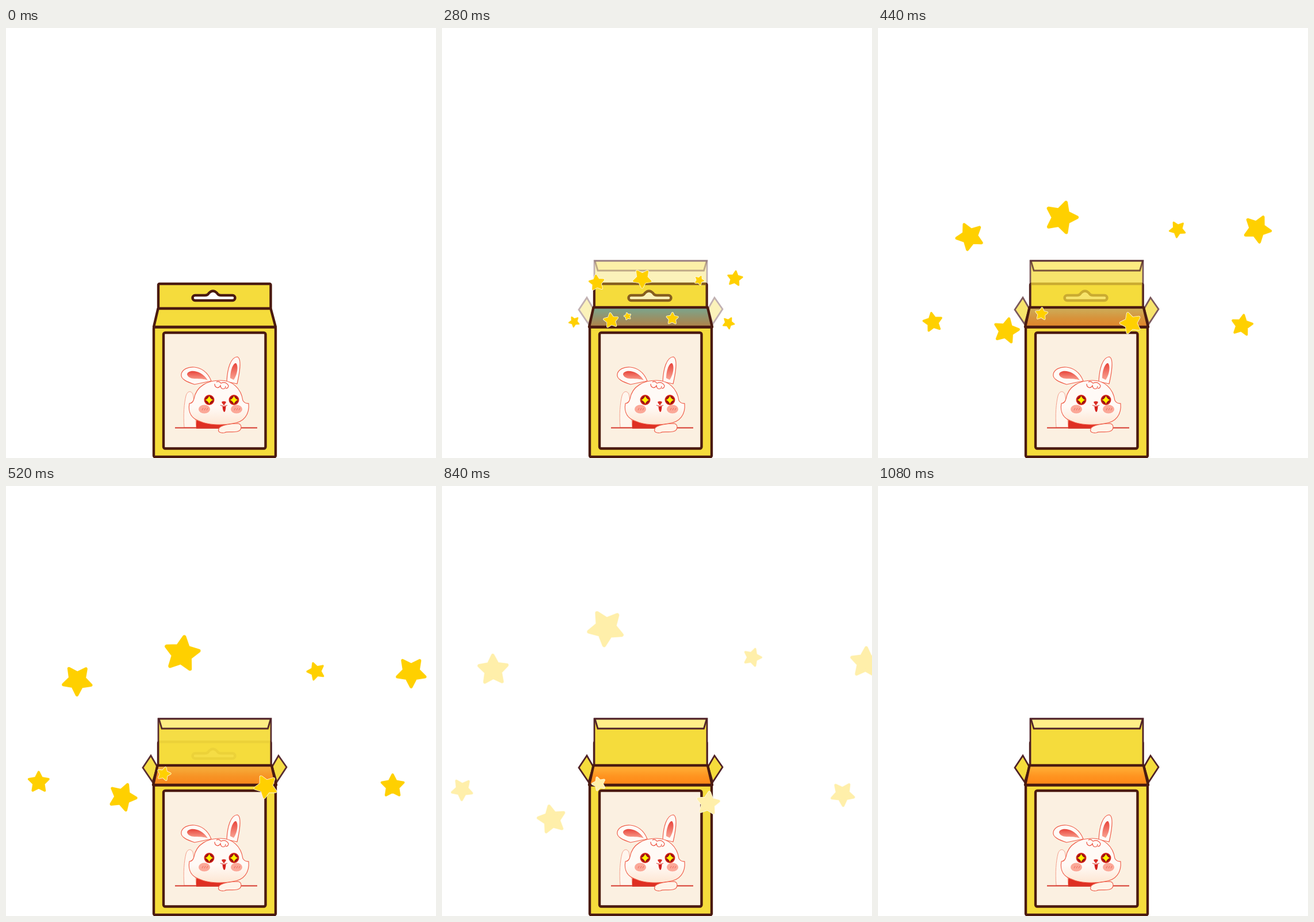
These frames come from a looping animation (748x748 px, 1120 ms). An HTML page:

```html
<!DOCTYPE html>
<html lang="en">
<head>
<meta charset="utf-8">
<title>Gift box</title>
<style>
  html, body { margin: 0; width: 100%; height: 100%; overflow: hidden; background: #fff; }
  svg { display: block; width: 100vw; height: 100vh; }
  .line { stroke: #4a1a10; stroke-width: 4.4; stroke-linejoin: round; }
  .thin { stroke: #4f2228; stroke-width: 2.8; }
  .box { fill: #f5dc3c; }
  .fur { fill: #fffaf6; stroke: #f0604c; stroke-width: 1.2; stroke-linejoin: round; }
  #open > * { opacity: var(--shown); }
</style>
</head>
<body>
<svg viewBox="0 0 748 748">
  <defs>
    <linearGradient id="dusk" x2="0" y2="1">
      <stop stop-color="#30a1c1"/><stop offset="1" stop-color="#878062"/>
    </linearGradient>
    <linearGradient id="glow" x2="0" y2="1">
      <stop stop-color="#ffb43a"/><stop offset=".55" stop-color="#ff9420"/><stop offset="1" stop-color="#ff8616"/>
    </linearGradient>
    <linearGradient id="earRed" x2="0" y2="1">
      <stop stop-color="#e8453c"/><stop offset="1" stop-color="#f9a493"/>
    </linearGradient>
    <linearGradient id="chin" x2="0" y2="1">
      <stop offset=".6" stop-color="#fffaf6"/><stop offset="1" stop-color="#fde6d3"/>
    </linearGradient>
    <path id="mouth" d="M263.500 486H462L470 520H256Z"/>
    <g id="eye">
      <circle r="8.3" fill="#9c1414" stroke="#e02a20" stroke-width="1.4"/>
      <path d="M0-7Q1.800-1.800 7 0Q1.800 1.800 0 7Q-1.800 1.800-7 0Q-1.800-1.800 0-7" fill="#fff200"/>
    </g>
    <g id="cheek">
      <ellipse rx="10" ry="7.5" fill="#fba898"/>
      <path d="M-4 2l2-4M0 2l2-4M4 2l2-4" stroke="#ee6a5c" fill="none"/>
    </g>
  </defs>

  <!-- closed lid -->
  <rect class="box line" x="265" y="445" width="195.500" height="43" rx="2"/>
  <path class="line" fill="#fff" d="M329 465H346Q351 465 353 461Q360 454 367 461Q369 465 374 465H394a4.500 4.500 0 0 1 0 9H329a4.500 4.500 0 0 1 0-9Z"/>
  <path id="lid" class="box line" d="M264.500 488H460.500L469 520H257Z"/>

  <!-- open lid -->
  <use id="inside" href="#mouth" fill="url(#dusk)"/>
  <g id="open">
    <path class="box thin" d="M252 469L263 488L255 515L238 490Z M474 469L488 489L471 515L463 488Z"/>
    <rect class="box thin" x="265" y="405" width="196" height="81"/>
    <path class="thin" fill="#ffee88" d="M266 405H460.500L455.500 422H271Z"/>
    <use href="#mouth" fill="url(#glow)"/>
  </g>
  <use id="rim" href="#mouth" class="line" fill="none"/>

  <!-- front -->
  <rect class="box line" x="257" y="520.500" width="212" height="225.500" rx="2"/>
  <rect class="line" x="274" y="530" width="177.500" height="201.500" rx="3" fill="#fbf0e1"/>

  <!-- rabbit -->
  <path d="M310 695C308 672 310 652 313 640C316 629 325 631 326 641L331 695Z" fill="#fff6ee" stroke="#f4a08c"/>
  <path d="M331 682Q352 691 384 689L372 697H331Z" fill="#df2f22"/>
  <path d="M294 695.500H437" stroke="#d63a2e" stroke-width="2"/>
  <path class="fur" d="M328 620C316 616 303 611 305 602C308 586 345 582 357 614Z"/>
  <path fill="url(#earRed)" d="M315 603C315 594 339 593 351 613C339 607 320 615 315 603Z"/>
  <path class="fur" d="M384 615C385 592 391 573 402 572C411 574 406 602 402 619Z"/>
  <path fill="url(#earRed)" d="M390 609C390 594 396 582 400 583C405 588 402 604 396 612Z"/>
  <path class="fur" style="fill:url(#chin)" d="M327 645C331 622 352 613 373 613C394 613 409 627 412 648Q416 654 422 653C424 672 414 686 394 688C374 692 350 690 337 684C324 680 316 670 319 653Q325 653 327 645Z"/>
  <path d="M363 619C363 626 370 628 373 622C374 630 382 629 382 623M366 616Q370 613 374 618Q382 614 387 622Q387 627 382 627" fill="none" stroke="#ee5544" stroke-width="1.2"/>
  <use href="#cheek" x="345" y="663"/><use href="#cheek" x="401" y="663"/>
  <use href="#eye" x="353.500" y="647"/><use href="#eye" x="396.500" y="647"/>
  <path d="M375 650.500Q379 648 383 650.500Q381 655 379 655Q377 655 375 650.500Z" fill="#d92a22"/>
  <path d="M373 656Q377 659 379 655Q381 659 385 656" fill="none" stroke="#d92a22"/>
  <path d="M376.500 658H382.500Q382 668 379.500 668Q377 666 376.500 658Z" fill="#d4201c"/>
  <path class="fur" style="fill:#fff3e8" d="M370 698C371 690 395 688 404 688C411 690 411 700 402 702C393 704 386 701 380 704C374 705 368 703 370 698Z"/>

  <g id="stars" stroke-linejoin="round"></g>
</svg>

<script>
const STEP = 40, STEPS = 28, OPEN = 160, FLIGHT = 680;
const ORIGIN = { x: 365, y: 520 };

// Resting place, radius, turn in degrees, and how far the path bends sideways and down
const star = (x, y, r, turn, sway, drop) => ({ x, y, r, turn, sway, drop });
const leftTurning = [
  star(89, 320, 27.5, 37, 11, -1),
  star(285, 247, 32.5, 8, 17, 24),
  star(463, 552, 20.5, 45, -2, -33),
  star(697, 536, 21.5, 0, 9, -16),
];
const rightTurning = [
  star(540, 298, 16.5, -20, 20, 4),
  star(737, 307, 27.5, 36, 4, -4),
  star(35, 528, 19.5, 0, -12, -15),
  star(191, 580, 25.5, 22, -6, -42),
  star(273, 518, 12, 15, -9, -22),
];

const $ = id => document.getElementById(id);
const clamp = v => Math.max(0, Math.min(1, v));
const show = (id, on) => $(id).style.display = on ? "" : "none";

function outline(x, y, r, degrees) {
  return Array.from({ length: 10 }, (_, k) => {
    const len = r * (k % 2 ? 0.47 : 0.92), a = k * Math.PI / 5 + degrees * Math.PI / 180;
    return `${(x + len * Math.sin(a)).toFixed(2)},${(y - len * Math.cos(a)).toFixed(2)}`;
  }).join(" ");
}

function drawStar(s, dir, age, color) {
  const d = clamp(age / FLIGHT);
  const travel = 0.9 * Math.sin(Math.PI / 2 * clamp(age / 455)) + 0.1 * age / FLIGHT;
  const bend = 6.75 * d * (1 - d) ** 2;
  const r = s.r * (1 - (1 - clamp(age / 400)) ** 2);
  const x = ORIGIN.x + (s.x - ORIGIN.x) * travel + s.sway * bend;
  const y = ORIGIN.y + (s.y - ORIGIN.y) * travel + s.drop * bend;
  const points = outline(x, y, r, s.turn + dir * 0.12 * (age - 360));
  return `<polygon points="${points}" stroke="#fffbe6" stroke-width="${0.2 * r + 1.6}"/>
    <polygon points="${points}" fill="${color}" stroke="${color}" stroke-width="${0.2 * r}"/>`;
}

function draw(t) {
  const age = t - OPEN, opened = age >= 0;
  show("lid", !opened);
  show("inside", opened);
  show("rim", opened);
  $("open").style.setProperty("--shown", opened ? clamp((age + 20) / 400) : 0);

  // Stars pale to white but stay opaque
  const fade = clamp((940 - t) / 300);
  const color = `rgb(255,${Math.round(255 - 47 * fade)},${Math.round(255 - 255 * fade)})`;
  const all = (list, dir) => list.map(s => drawStar(s, dir, age, color)).join("");
  $("stars").innerHTML = age > 0 && fade > 0 ? all(leftTurning, -1) + all(rightTurning, 1) : "";
}

const start = performance.now();
function tick() {
  // One millisecond of slack keeps rounding from showing the previous step
  const step = Math.floor((performance.now() - start + 1) / STEP) % STEPS;
  draw(step * STEP);
  requestAnimationFrame(tick);
}
tick();
</script>
</body>
</html>
```
